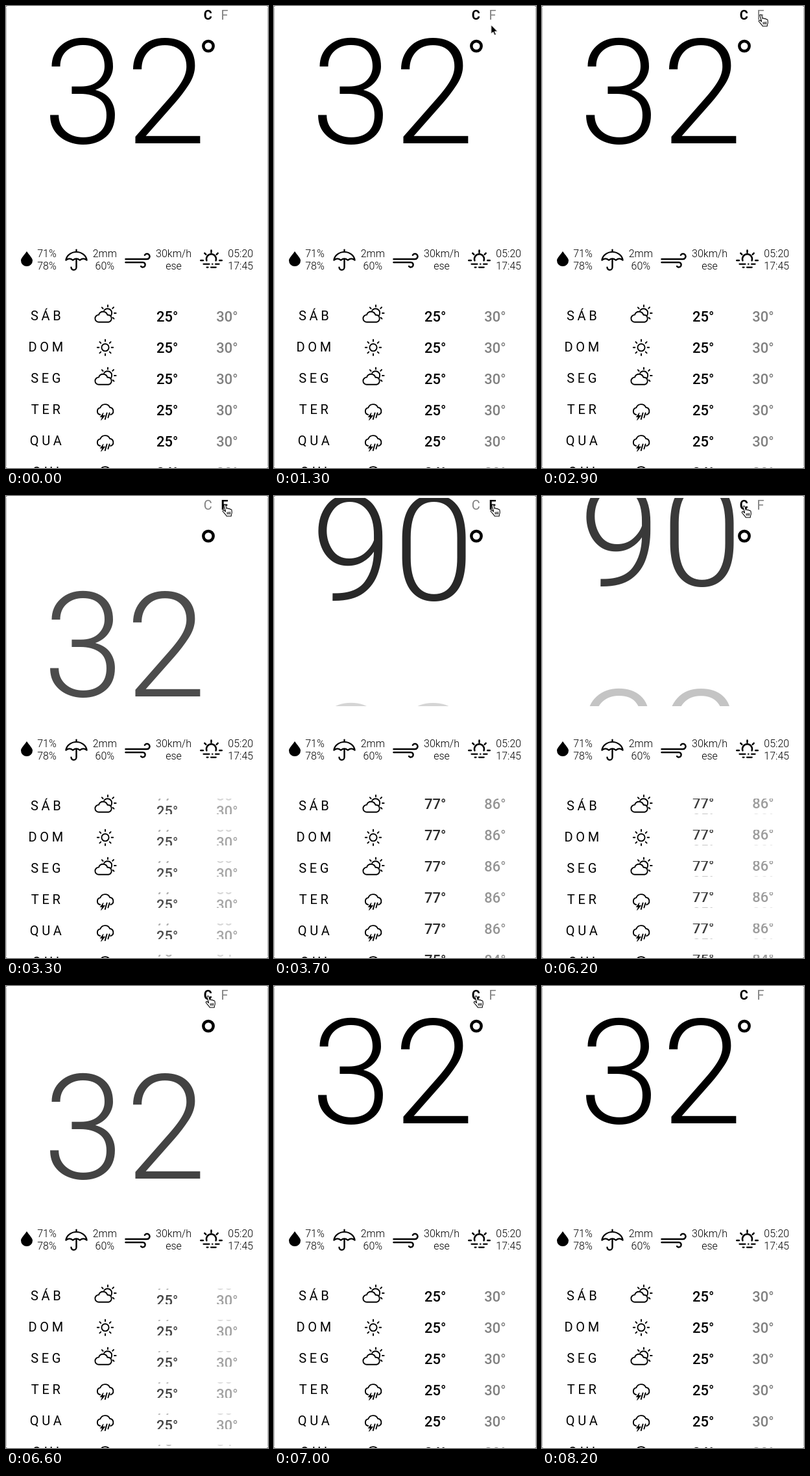
Recreate the animation shown at these times as an HTML page. Size 404x710 px, loop 8.3 s.

```html
<!DOCTYPE html>
<html lang="pt">
<head>
<meta charset="utf-8">
<title>Previsão do tempo</title>
<style>
  /* 0 shows Celsius, 1 shows Fahrenheit */
  @property --p { syntax: "<number>"; inherits: true; initial-value: 0; }

  html, body { margin: 0; width: 100%; height: 100%; overflow: hidden; background: #777; }
  #stage {
    display: block; width: 404px; height: 710px;
    font-family: Roboto, "Open Sans", sans-serif;
    text-anchor: middle;
    animation: roll 8.3s infinite;
  }

  .f { transform: translateY(calc((var(--p) - 1) * var(--h))); opacity: var(--p); }
  .c { transform: translateY(calc(var(--p) * var(--h))); opacity: calc(1 - var(--p)); }
  .big { --h: 320px; font-size: 224px; font-weight: 300; letter-spacing: 3px; }
  .temp { --h: 24px; font-size: 22px; font-weight: 500; }
  .grey { fill: #808080; }
  .unit { font-size: 20px; }
  .on { font-weight: 700; }
  .info { font-size: 16px; font-weight: 300; }
  .day { font-size: 20px; letter-spacing: 4.7px; }

  .line { fill: none; stroke: #000; stroke-width: 2.5; stroke-linecap: round; stroke-linejoin: round; }
  .thin { stroke-width: 1.9; }

  .celsius { animation: celsius 8.3s step-end infinite; }
  .fahrenheit { animation: fahrenheit 8.3s step-end infinite; }
  .cursor { animation: move 8.3s infinite; }
  .hand { animation: hand 8.3s step-end infinite; }
  .arrow { animation: arrow 8.3s step-end infinite; }

  @keyframes roll {
    0%, 34.88% { --p: 0; animation-timing-function: cubic-bezier(.37, 0, .63, 1); }
    48.05%, 70.16% { --p: 1; animation-timing-function: cubic-bezier(.37, 0, .63, 1); }
    84.5%, 100% { --p: 0; }
  }
  @keyframes celsius { 0%, 71% { opacity: 1; } 36% { opacity: 0; } }
  @keyframes fahrenheit { 0%, 71% { opacity: 0; } 36% { opacity: 1; } }
  @keyframes move {
    0% { transform: translate(230px, 714px); animation-timing-function: linear; }
    1.2% { transform: translate(235px, 668px); animation-timing-function: ease-in-out; }
    10.84% { transform: translate(318px, 115px); animation-timing-function: ease-out; }
    18.07%, 57.83% { transform: translate(333px, 12px); animation-timing-function: linear; }
    62.65% { transform: translate(313px, 12px); animation-timing-function: ease-out; }
    66.27%, 90.4% { transform: translate(307px, 14px); animation-timing-function: ease-in; }
    98.6%, 100% { transform: translate(230px, 714px); }
  }
  @keyframes hand { 0%, 91.2% { opacity: 0; } 16.3% { opacity: 1; } }
  @keyframes arrow { 0%, 91.2% { opacity: 1; } 16.3% { opacity: 0; } }
</style>
</head>
<body>
<svg id="stage" viewBox="0 0 404 710">
  <defs>
    <g id="cloudy" class="line thin">
      <path d="M143 485.8a5.6 5.6 0 0 1 0-11.2a7 7 0 0 1 13.4.2a5.5 5.5 0 0 1 1.6 11z"/>
      <path d="M151.2 468a6.6 6.6 0 1 1 10.8 7.6"/>
      <path d="M157 459.8v2.4M147.8 463.2l1.8 1.8M166 463l-1.8 1.8M167 472h2.6M164.8 479l1.7 1.7"/>
    </g>
    <g id="sun" class="line thin">
      <circle cx="153" cy="476.8" r="5.6"/>
      <path id="rays"/>
    </g>
    <g id="storm" class="line thin">
      <path d="M145.2 484a5.4 5.4 0 0 1 .1-10.6a8 8 0 0 1 14.9-.4a5.6 5.6 0 0 1 1 11"/>
      <path d="M149.8 481.5l-4.4 6h3.2l-2 5l6-7h-3.4z" fill="#000" stroke-width=".8"/>
      <path d="M155.6 481.5l-2.8 9.5M159.6 481.5l-2.2 7"/>
    </g>
  </defs>

  <rect width="404" height="710" rx="3" fill="#fff"/>
  <path d="M.5 3v704M403.5 3v704" stroke="#c4c4c4"/>

  <svg class="big" y="3" width="404" height="320">
    <text class="f" x="184.4" y="208">90</text>
    <text class="c" x="184.4" y="208">32</text>
  </svg>
  <circle cx="312" cy="61.6" r="7.7" fill="none" stroke="#000" stroke-width="4.5"/>

  <g class="unit">
    <g class="celsius">
      <text class="on" x="311.3" y="20.7">C</text>
      <text class="grey" x="337" y="20.7">F</text>
    </g>
    <g class="fahrenheit">
      <text class="grey" x="311.3" y="20.7">C</text>
      <text class="on" x="337" y="20.7">F</text>
    </g>
  </g>

  <path d="M32 377C35 382 41 387 41 391.2a9 8.8 0 0 1-18 0C23 387 29 382 32 377z"/>
  <g class="line">
    <path d="M92.4 390.6a16.2 14.2 0 0 1 32.2 0q-5.4-4.4-10.7 0q-5.4-4.4-10.8 0q-5.3-4.4-10.7 0z" stroke-width="2.2"/>
    <path d="M108.5 374.6v1.8M108.5 389v12.4a4 4 0 0 1-8 .4" stroke-width="2.4"/>
    <path d="M184.5 389H217.5a4.1 4.1 0 1 0-3.6-6.2M184.5 394H211a3.7 3.7 0 1 1-2.9 6"/>
    <path d="M309.4 391.2a7.5 7.5 0 1 1 14.2 0M316.5 375.5v3.2M306.3 379.8l2 2M326.7 379.8l-2 2M300.3 391h3.6M329.2 391h3.6"/>
    <path d="M304.5 396.6h9M318 396.6h.6M323 396.6h5.6M309.6 401.6h2M316 401.6h7.8" stroke-width="2.2"/>
  </g>

  <g id="info" class="info"></g>
  <g id="days"></g>

  <g class="cursor">
    <g class="hand" fill="#fff" stroke="#000" stroke-width="1.1" stroke-linejoin="round">
      <path d="M5.4 11L3.1 3.4C2.7 1 5.2.4 5.8 2.4L7.3 7.5C8.2 6.2 9.6 6.6 10 7.8C11 6.9 12.2 7.4 12.6 8.6C13.8 8 15 8.8 15.1 10.2L15.3 13C15.3 15 14.3 16 14.2 19H7.2C6.5 17 3.6 14.5 1.6 12C.6 10.6 2 9.2 3.6 10.2L5.4 12z"/>
      <path d="M8 12.6l.4 3.6M10.2 12.4l.2 3.8M12.4 12.2v4" fill="none"/>
    </g>
    <path class="arrow" d="M4 1v14l3.2-3l2.2 5l2.4-1l-2.2-4.8h4.4z" stroke="#fff"/>
  </g>
</svg>
<script>
  const byId = id => document.getElementById(id);

  byId("rays").setAttribute("d", Array.from({ length: 8 }, (_, i) => {
    const a = i * Math.PI / 4;
    const at = r => `${153 + r * Math.cos(a)} ${476.8 + r * Math.sin(a)}`;
    return `M${at(9.6)}L${at(12.2)}`;
  }).join(""));

  const info = [
    [63, "71%", "78%"],
    [152.3, "2mm", "60%"],
    [258.5, "30km/h", "ese"],
    [361.7, "05:20", "17:45"]
  ];
  byId("info").innerHTML = info.map(([x, top, bottom]) =>
    `<text x="${x}" y="386">${top}</text><text x="${x}" y="405">${bottom}</text>`
  ).join("");

  const toF = c => Math.round(c * 1.8 + 32);

  // A clipped window in which the two units roll past each other
  const temp = (x, c, cls = "") => `
    <svg class="temp ${cls}" x="${x - 30}" y="465" width="60" height="24">
      <text class="f" x="30" y="20">${toF(c)}°</text>
      <text class="c" x="30" y="20">${c}°</text>
    </svg>`;

  const days = [
    ["SÁB", "cloudy", 25, 30],
    ["DOM", "sun", 25, 30],
    ["SEG", "cloudy", 25, 30],
    ["TER", "storm", 25, 30],
    ["QUA", "storm", 25, 30],
    ["QUI", "storm", 24, 29]
  ];
  byId("days").innerHTML = days.map(([name, icon, low, high], i) => `
    <g transform="translate(0 ${i * 48})">
      <text class="day" x="63.7" y="483">${name}</text>
      <use href="#${icon}"/>
      ${temp(248.7, low)}${temp(340.9, high, "grey")}
    </g>`).join("");
</script>
</body>
</html>
```
